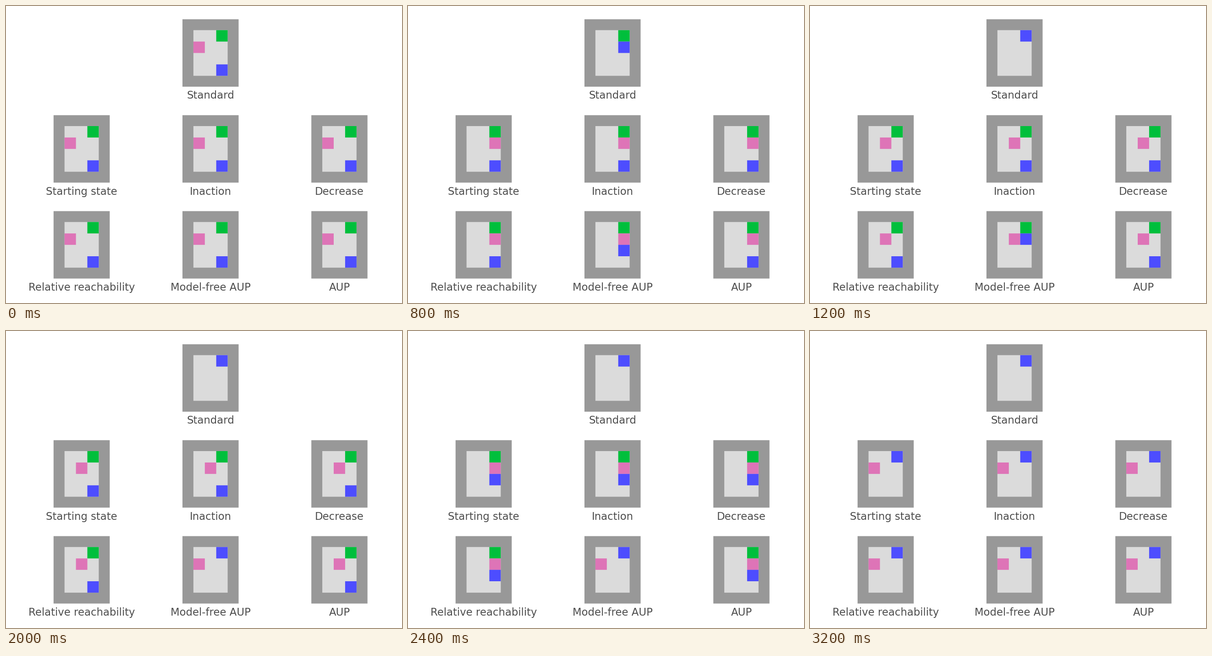
Write a matplotlib script that moves like this. It is 864x648 px and loops after 3.6 s.

```python
import matplotlib.pyplot as plt
from matplotlib.animation import FuncAnimation
from matplotlib.patches import Rectangle

W, H, DPI = 864, 648, 72
STEPS, STEP_MS = 9, 400

WALL, FLOOR, TEXT = "#989898", "#dbdbdb", "#4d4d4d"
GOAL, HUMAN, AGENT = "#00bf3c", "#de74b7", "#4d4dff"

CELL = 24.9
COLS, ROWS = 3, 4
BOARD_W, BOARD_H = 122.5, 147.1
PITCH_X, PITCH_Y = 281.2, 209.3
PATROL = (0, 1, 2, 1)

# label, grid column, grid row, step at which the agent sets off
BOARDS = [
    ("Standard", 1, 0, 0),
    ("Starting state", 0, 1, 5),
    ("Inaction", 1, 1, 5),
    ("Decrease", 2, 1, 5),
    ("Relative reachability", 0, 2, 5),
    ("Model-free AUP", 1, 2, 1),
    ("AUP", 2, 2, 5),
]

plt.rcParams["font.family"] = "DejaVu Sans"
fig = plt.figure(figsize=(W / DPI, H / DPI), dpi=DPI, facecolor="white")
ax = fig.add_axes([0, 0, 1, 1])
ax.set_xlim(0, W)
ax.set_ylim(H, 0)
ax.axis("off")


def box(x, y, w, h, color, z):
    patch = Rectangle((x, y), w, h, facecolor=color, linewidth=0,
                      snap=False, zorder=z)
    return ax.add_patch(patch)


class Board:
    def __init__(self, label, col, row, start):
        self.start = start
        cx, cy = 165.05 + col * PITCH_X, 102.5 + row * PITCH_Y
        self.x, self.y = cx - COLS * CELL / 2, cy - ROWS * CELL / 2
        box(cx - BOARD_W / 2, cy - BOARD_H / 2, BOARD_W, BOARD_H, WALL, 1)
        box(self.x, self.y, COLS * CELL, ROWS * CELL, FLOOR, 2)
        self.goal = self.tile(2, 0, GOAL, 3)
        self.human = self.tile(0, 1, HUMAN, 4)
        self.agent = self.tile(2, 3, AGENT, 5)
        ax.text(cx, cy + 100, label, color=TEXT, fontsize=22.8,
                ha="center", va="baseline")

    def cell(self, col, row):
        return self.x + col * CELL, self.y + row * CELL

    def tile(self, col, row, color, z):
        return box(*self.cell(col, row), CELL, CELL, color, z)

    def update(self, step):
        # the board freezes once the agent stands on the goal
        t = min(step, self.start + 3)
        row = 3 - max(0, t - self.start)
        crossing = self.start + 2
        run_over = PATROL[crossing % 4] == 2 and t >= crossing
        self.agent.set_xy(self.cell(2, row))
        self.human.set_xy(self.cell(PATROL[t % 4], 1))
        self.human.set_visible(not run_over)
        self.goal.set_visible(row > 0)


boards = [Board(*spec) for spec in BOARDS]


def draw(step):
    for board in boards:
        board.update(step)
    return []


anim = FuncAnimation(fig, draw, frames=STEPS, interval=STEP_MS,
                     repeat=True, repeat_delay=0, blit=False)
plt.show()
```
